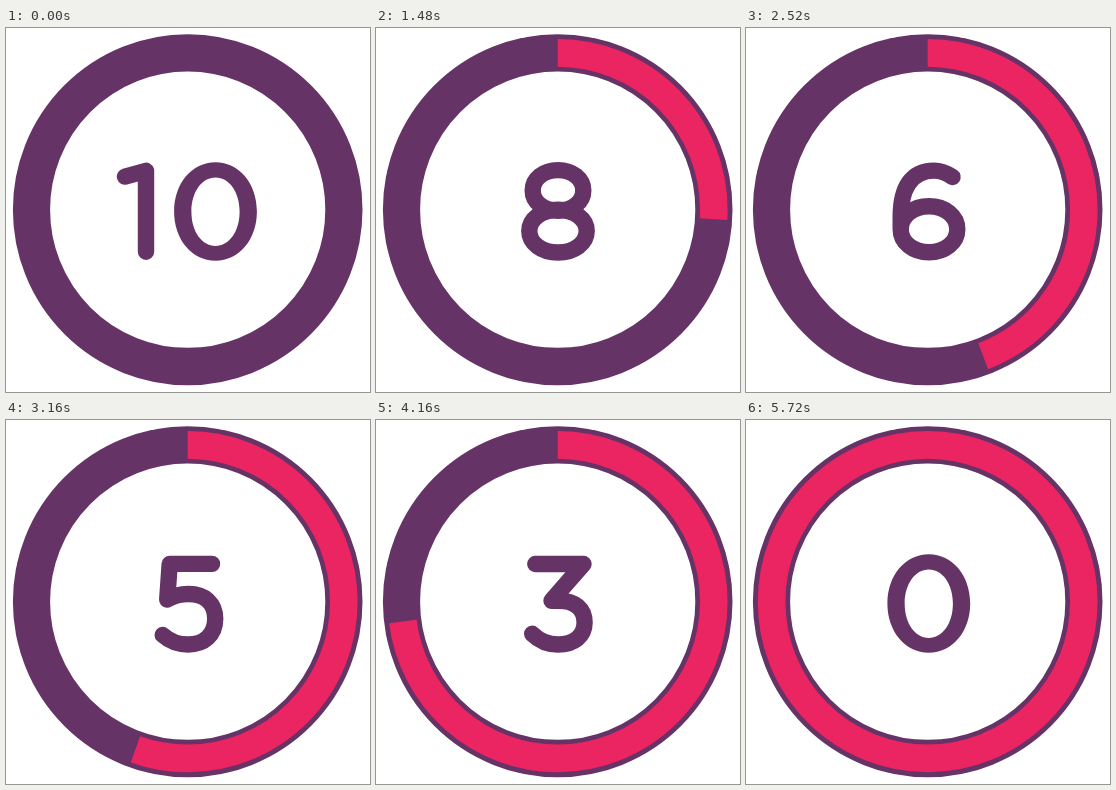
Write an HTML page that moves like this. It is 364 px wide and 364 px high and loops after 6.32 s.

```html
<!DOCTYPE html>
<html lang="en">
<head>
<meta charset="utf-8">
<title>Countdown</title>
<style>
  html, body { margin: 0; width: 100%; height: 100%; overflow: hidden; background: #fff; }
  svg { display: block; width: 100vw; height: 100vh; }
  .ring { fill: none; stroke: #663366; stroke-width: 37.2; }
  .bar { fill: none; stroke: #eb2561; stroke-width: 27.6; }
  .digit { fill: none; stroke: #663366; stroke-width: 16.4; stroke-linecap: round; stroke-linejoin: round; }
  .zero { fill: #663366; fill-rule: evenodd; stroke: none; }
</style>
</head>
<body>
<svg viewBox="0 0 364 364" role="img" aria-label="Countdown from 10 to 0">
  <g transform="translate(181.7 181.7) scale(1 1.004) rotate(-90)">
    <circle class="ring" r="156.2"/>
    <circle class="bar" r="156.1" pathLength="360"/>
  </g>
  <g id="digits" class="digit"></g>
</svg>
<script>
const LOOP = 6320, RUN = 5700, STEP = 40;

// Closed oval; k sets how square the shoulders are.
function oval(cx, cy, rx, ry, k = 0.57) {
  const x = rx * k, y = ry * k;
  return `M${cx} ${cy - ry}` +
    `c${x} 0 ${rx} ${ry - y} ${rx} ${ry}` +
    `s${x - rx} ${ry} ${-rx} ${ry}` +
    `s${-rx} ${y - ry} ${-rx} ${-ry}` +
    `s${rx - x} ${-ry} ${rx} ${-ry}z`;
}

const line = (d, move = "") => `<path d="${d}" transform="${move}"/>`;
const zero = x => `<path class="zero" d="${oval(x, 183.5, 41.4, 49.2)}${oval(x, 183.7, 24.1, 34.2)}"/>`;
const one = x => line("M119 148.6L140 142.8V223.8", `translate(${x} 0)`);
const six = "M206.5 149C200 144.5 194 142.6 188 142.6C165 142.6 154.7 160 154.7 189V201" +
  oval(183, 201.3, 28.3, 23);

const glyphs = [
  zero(182.8),
  one(48),
  line("M157.5 154.8C164 146.5 172 142.8 181.5 142.8C196 142.8 206.3 151.5 206.3 165C206.3 177 200 185 190 193.5L154.6 222.8H208"),
  line("M159.3 144H207.5L175.5 180.7H183C199 180.7 208.6 189 208.6 202.5C208.6 216 198 224.5 182 224.5C172 224.5 163 220.5 156.2 213.8"),
  line("M196 143L151.5 203.5H213M196 143V224"),
  line("M206 143.9H163.7L161.2 179.5C167 176 174 174 182.5 174C199 174 209.2 183.5 209.2 198.8C209.2 215 198 224.5 182 224.5C172 224.5 164 221.5 156.7 215"),
  line(six),
  line("M156.5 143.9H207.5L171 224"),
  line(oval(182, 162.4, 25.3, 20.3) + oval(182, 203.1, 28.7, 21.4)),
  line(six, "rotate(180 182.3 183.5)"),
  one(0) + zero(209.5)
];

const bar = document.querySelector(".bar");
const digits = document.getElementById("digits");
const start = performance.now();
let shown = -1;

function draw() {
  const t = Math.floor(((performance.now() - start) % LOOP) / STEP) * STEP;
  const angle = Math.min(360, 360 * t / RUN);
  bar.style.visibility = angle ? "visible" : "hidden";
  bar.setAttribute("stroke-dasharray", angle < 360 ? `${angle} 400` : "none");

  const count = Math.max(0, 10 - Math.floor(t * 10 / RUN));
  if (count !== shown) digits.innerHTML = glyphs[shown = count];
  requestAnimationFrame(draw);
}
draw();
</script>
</body>
</html>
```
